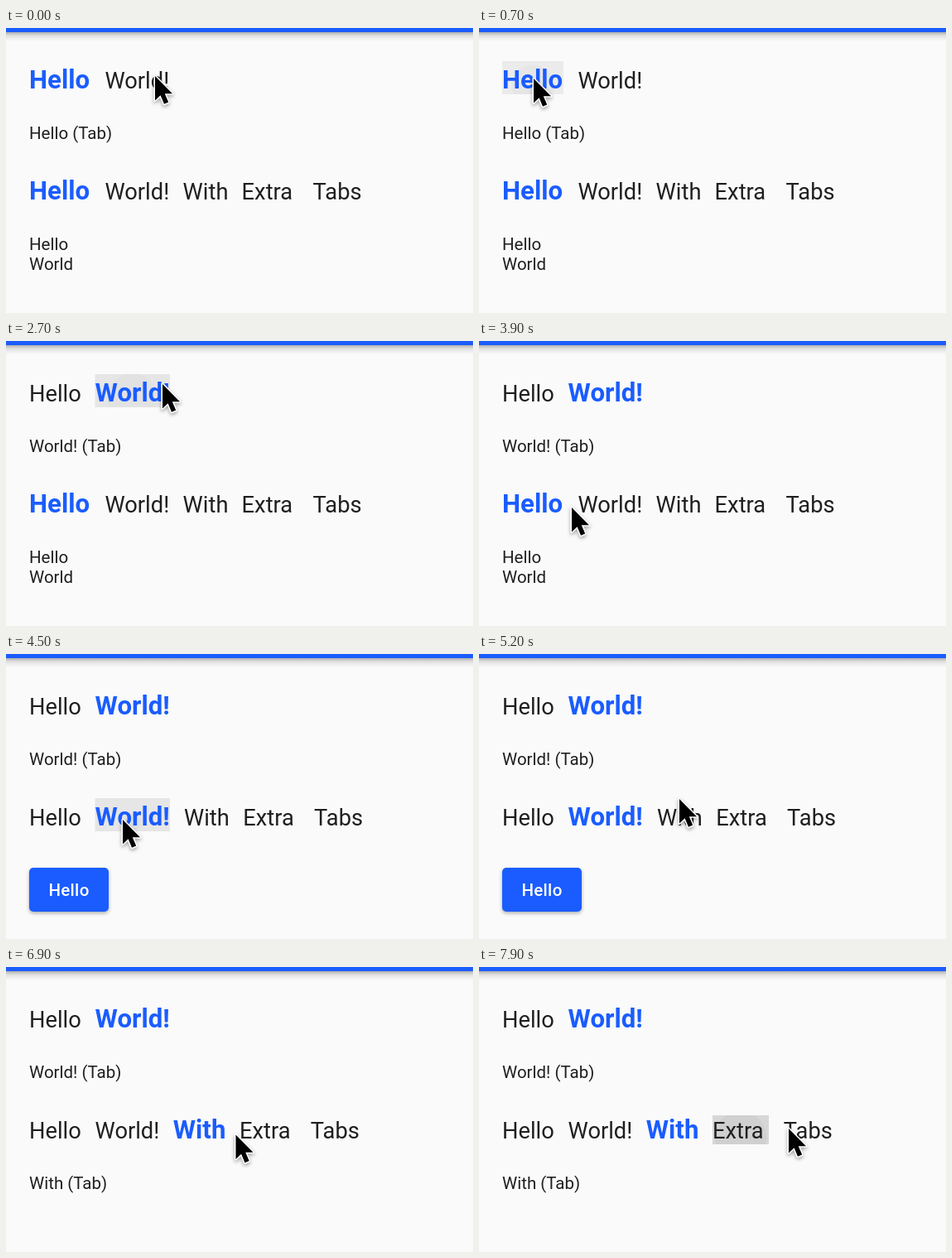
Write an HTML page that moves like this. It is 564 px wide and 344 px high and loops after 8 s.

```html
<!DOCTYPE html>
<html lang="en">
<head>
<meta charset="utf-8">
<title>Tabs</title>
<style>
  html, body { margin: 0; width: 100%; height: 100%; overflow: hidden; background: #fafafa; }
  svg { display: block; font: 20.5px Roboto, sans-serif; fill: #1f1f1f; }
  .tab { font-size: 27.3px; }
  .tab.active { font-size: 31.2px; font-weight: 600; fill: #1a5cff; }
  .button { filter: drop-shadow(0 2px 2px rgba(0, 0, 0, .3)); }
  .label { font-weight: 500; letter-spacing: .3px; fill: #fff; text-anchor: middle; }
  .cursor { filter: drop-shadow(0 2px 2px rgba(0, 0, 0, .35)); }
</style>
</head>
<body>
<svg width="564" height="344" viewBox="0 0 564 344">
  <defs>
    <linearGradient id="shade" x2="0" y2="1">
      <stop offset="0" stop-opacity=".3"/>
      <stop offset=".4" stop-opacity=".1"/>
      <stop offset="1" stop-opacity="0"/>
    </linearGradient>
    <clipPath id="clip"><rect id="clipBox"/></clipPath>
  </defs>
  <rect width="564" height="344" fill="#fafafa"/>
  <rect y="5" width="564" height="11" fill="url(#shade)"/>
  <rect width="564" height="5" fill="#1a5cff"/>
  <g id="focus">
    <rect id="focusBox"/>
    <circle id="ripple" clip-path="url(#clip)"/>
  </g>
  <g id="rows"></g>
  <text id="topContent" x="28" y="134"></text>
  <g id="lines"><text x="28" y="268">Hello</text><text x="28" y="291.7">World</text></g>
  <g id="button">
    <rect class="button" x="28" y="258" width="96" height="53" rx="5" fill="#1a5cff"/>
    <text class="label" x="76" y="291.7">Hello</text>
  </g>
  <text id="withContent" x="28" y="268">With (Tab)</text>
  <path id="cursor" class="cursor" d="M0 0V29.5L6.6 23.3 11 33.8 16.2 31.6 11.8 21.2H21Z"
        stroke="#fff" stroke-width="3" stroke-linejoin="round" paint-order="stroke" fill="#000"/>
</svg>
<script>
const LOOP = 8000, STEP = 100;
const el = id => document.getElementById(id);
const set = (node, attrs) => Object.entries(attrs).forEach(([k, v]) => node.setAttribute(k, v));
const show = (id, on) => set(el(id), { display: on ? 'inline' : 'none' });

// Left edge of every tab, by selected tab.
const lefts = [
  [28, 119.5, 213.6, 284.6, 370.5],
  [28, 107.6, 215, 286.2, 372],
  [28, 107.6, 201.8, 282, 367.8]
];
const names = ['Hello', 'World!', 'With', 'Extra', 'Tabs'];

function makeRow(count, y) {
  return names.slice(0, count).map(name => {
    const text = document.createElementNS('http://www.w3.org/2000/svg', 'text');
    text.textContent = name;
    set(text, { y });
    el('rows').append(text);
    return text;
  });
}
const topRow = makeRow(2, 73), bottomRow = makeRow(5, 206.8);

function select(row, index) {
  row.forEach((text, i) => set(text, {
    x: lefts[index][i],
    class: i === index ? 'tab active' : 'tab'
  }));
}

// Cursor tip: time, x, y.
const path = [
  [0, 180, 58], [200, 66, 61], [900, 66, 61], [1400, 64, 66], [1500, 64, 66], [1600, 68, 63],
  [2400, 189, 52], [3100, 189, 52], [3900, 112, 201], [4000, 134, 201], [4100, 141, 200],
  [4600, 141, 200], [5200, 242, 175], [5700, 242, 175], [6200, 245, 202], [6800, 245, 202],
  [7000, 310, 203], [7200, 310, 203], [7900, 374, 195]
];
function cursorAt(t) {
  const next = path.findIndex(p => p[0] >= t);
  if (next < 1) return path[0].slice(1);
  const [t0, x0, y0] = path[next - 1], [t1, x1, y1] = path[next];
  const p = (t - t0) / (t1 - t0), e = p * p * (3 - 2 * p);
  return [x0 + (x1 - x0) * e, y0 + (y1 - y0) * e];
}

// Focus highlights: shown between start and end, shade and ripple in black opacity.
const highlights = [
  { start: 500, end: 2500, x: 28, y: 40, width: 74, height: 40, shade: .06, ripple: .04, fade: 300 },
  { start: 2500, end: 2900, x: 107.5, y: 40, width: 90.5, height: 40, shade: .08, ripple: .03, fade: 300 },
  { start: 4500, end: 4800, x: 107.5, y: 174, width: 90.5, height: 40, shade: .08, ripple: .03, fade: 300 },
  { start: 6400, end: 6600, x: 201.5, y: 174, width: 64, height: 40, shade: .08, ripple: .03, fade: 300 },
  { start: 7300, end: 8000, x: 282, y: 179, width: 68, height: 35, shade: .14, ripple: .06, fade: 1000 }
];
function drawHighlight(t) {
  const h = highlights.find(h => t >= h.start && t < h.end);
  show('focus', h);
  if (!h) return;
  const { x, y, width, height } = h, age = t - h.start;
  set(el('focusBox'), { x, y, width, height, 'fill-opacity': h.shade, fill: '#000' });
  set(el('clipBox'), { x, y, width, height });
  set(el('ripple'), {
    cx: x + width / 2, cy: y + height * .75, fill: '#000',
    r: Math.min(1, (age + 100) / 400) * width * .46,
    'fill-opacity': h.ripple * Math.max(0, 1 - age / h.fade * .8) * (age > h.fade ? 0 : 1)
  });
}

function draw(t) {
  const top = t < 2500 ? 0 : 1;
  const bottom = t < 4500 ? 0 : t < 6400 ? 1 : 2;
  select(topRow, top);
  select(bottomRow, bottom);
  el('topContent').textContent = names[top] + ' (Tab)';
  show('lines', bottom === 0);
  show('button', bottom === 1);
  show('withContent', bottom === 2);
  drawHighlight(t);
  set(el('cursor'), { transform: `translate(${cursorAt(Math.min(t, 7900))})` });
}

const began = performance.now();
function tick() {
  const t = (performance.now() - began) % LOOP;
  draw(Math.floor(t / STEP) * STEP);
  requestAnimationFrame(tick);
}
tick();
</script>
</body>
</html>
```
